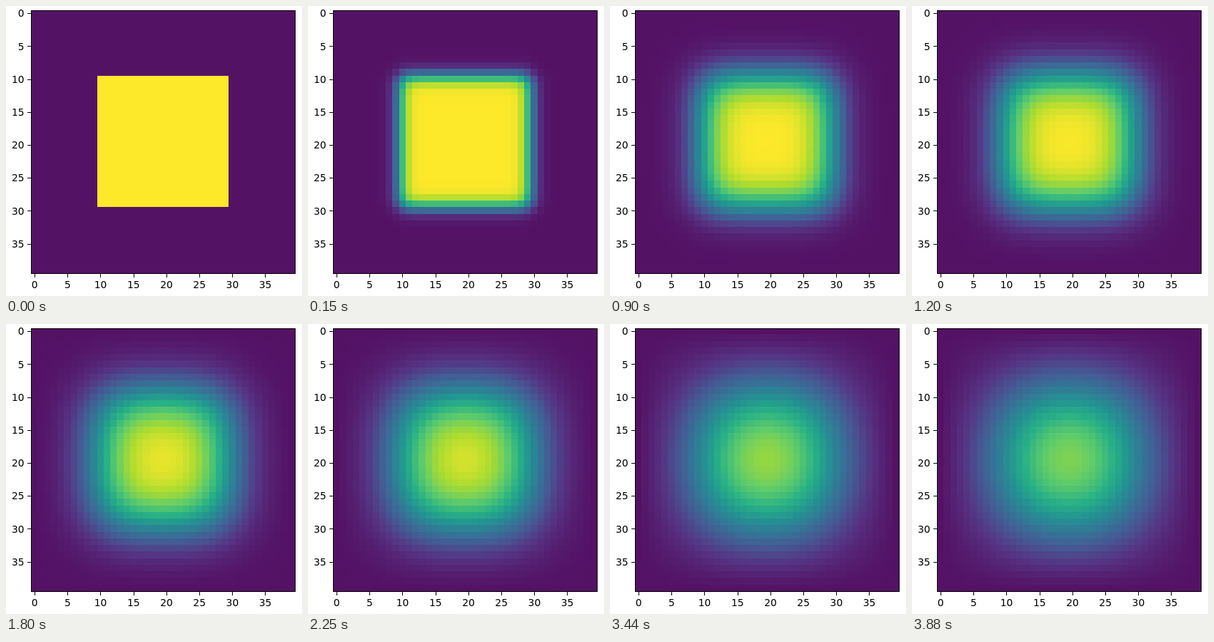
These frames come from a looping animation (415 px wide and 407 px high, 4930 ms). An HTML page with a canvas:

```html
<!DOCTYPE html>
<html lang="en">
<head>
<meta charset="utf-8">
<title>Heat diffusion</title>
<style>
  html, body { margin: 0; width: 100%; height: 100%; overflow: hidden; background: #fff; }
  canvas { display: block; }
</style>
</head>
<body>
<canvas id="plot" width="415" height="407"></canvas>
<script>
const ctx = document.getElementById('plot').getContext('2d');

const SIZE = 40, CELL = 9.24, LEFT = 35.2, TOP = 5.2;
const LOOP = 4930, STEP = 150;
const SUBSTEPS = 10, RATE = 0.074;
const CHANGES = [0, 150, 300, 450, 750, 900, 1050, 1200, 1500, 1800, 2250, 2700, 2990, 3440, 3880];
const COLORS = [
  [84, 18, 101], [86, 50, 130], [70, 88, 148], [52, 118, 151], [35, 147, 146],
  [41, 177, 134], [96, 204, 106], [173, 220, 48], [254, 232, 42]
];

function color(value) {
  const pos = Math.min(Math.max(value, 0), 0.99999) * (COLORS.length - 1);
  const i = Math.floor(pos);
  const mix = COLORS[i].map((c, n) => Math.round(c + (COLORS[i + 1][n] - c) * (pos - i)));
  return `rgb(${mix})`;
}

function hotSquare() {
  const inside = n => n >= 10 && n < 30;
  return Float64Array.from({ length: SIZE * SIZE },
    (_, i) => +(inside(i % SIZE) && inside(Math.floor(i / SIZE))));
}

// One explicit step of the heat equation; the border stays cold.
function diffuse(heat) {
  const next = heat.slice();
  for (let y = 1; y < SIZE - 1; y++) {
    for (let x = 1; x < SIZE - 1; x++) {
      const i = y * SIZE + x;
      next[i] += RATE * (heat[i - 1] + heat[i + 1] + heat[i - SIZE] + heat[i + SIZE] - 4 * heat[i]);
    }
  }
  return next;
}

const states = [hotSquare()];
for (let n = 1; n <= LOOP / STEP; n++) {
  let heat = states[n - 1];
  for (let s = 0; s < SUBSTEPS; s++) heat = diffuse(heat);
  states.push(heat);
}

function drawHeat(heat) {
  const edge = (origin, n) => Math.round(origin + n * CELL);
  for (let y = 0; y < SIZE; y++) {
    for (let x = 0; x < SIZE; x++) {
      const px = edge(LEFT, x), py = edge(TOP, y);
      ctx.fillStyle = color(heat[y * SIZE + x]);
      ctx.fillRect(px, py, edge(LEFT, x + 1) - px, edge(TOP, y + 1) - py);
    }
  }
}

function drawAxes() {
  ctx.clearRect(35, 0, 371, 6);
  ctx.strokeStyle = ctx.fillStyle = '#000';
  ctx.lineWidth = 1;
  ctx.strokeRect(35.5, 6.5, 370, 369);
  ctx.font = '13.89px "DejaVu Sans", sans-serif';
  for (let n = 0; n < SIZE; n += 5) {
    const x = 39.9 + n * CELL, y = 10.2 + n * CELL;
    ctx.fillRect(Math.round(x), 376, 1, 5);
    ctx.fillRect(30, Math.round(y), 5, 1);
    ctx.textAlign = 'center';
    ctx.fillText(n, x + 0.3, 396);
    ctx.textAlign = 'right';
    ctx.fillText(n, 25.6, Math.round(y + 5.2));
  }
}

let shown = -1;
function render(now) {
  const time = now % LOOP;
  const start = CHANGES.findLast(t => t <= time);
  if (start !== shown) {
    shown = start;
    ctx.clearRect(0, 0, 415, 407);
    drawHeat(states[Math.round(start / STEP)]);
    drawAxes();
  }
}

const origin = performance.now();
function tick() {
  render(performance.now() - origin);
  requestAnimationFrame(tick);
}
tick();
</script>
</body>
</html>
```
